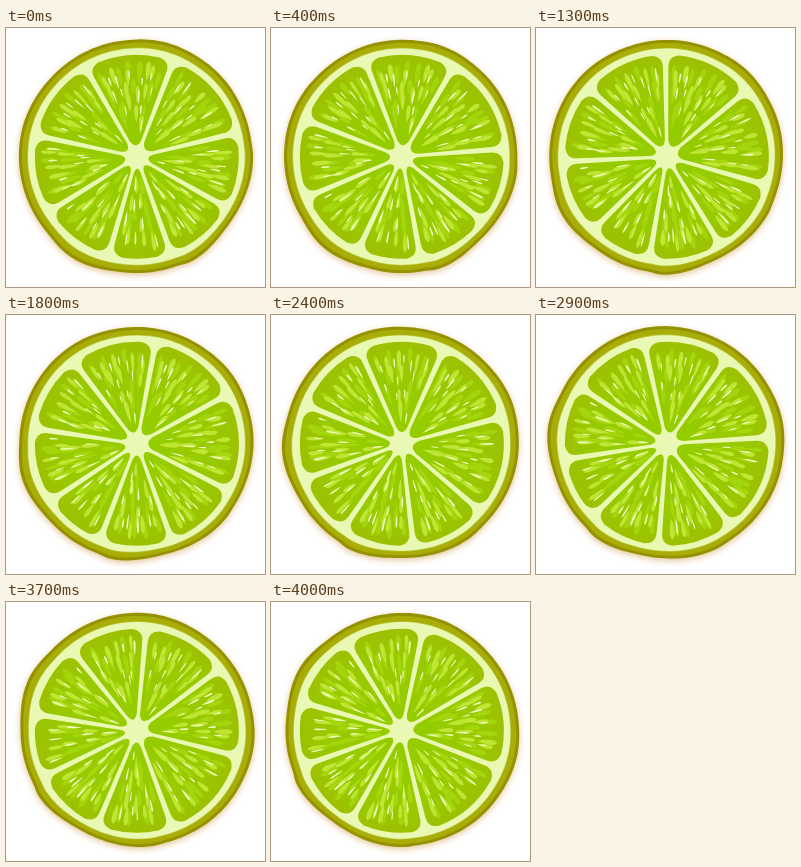
An HTML page for the animation above (4.1 s loop, 259 px wide and 259 px high).

```html
<!DOCTYPE html>
<html lang="en">
<head>
<meta charset="utf-8">
<title>Lime</title>
<style>
html, body { margin: 0; width: 100%; height: 100%; overflow: hidden; background: #fff; }
svg { display: block; width: 100vw; height: 100vh; }
#shade { filter: drop-shadow(0 2px 3px #dcb67acc); }
</style>
</head>
<body>
<svg viewBox="0 0 259 259">
  <defs>
    <radialGradient id="pulp" gradientUnits="userSpaceOnUse" cx="0" cy="0" r="103">
      <stop offset=".3" stop-color="#95cc00"/>
      <stop offset=".75" stop-color="#98c900"/>
      <stop offset="1" stop-color="#9dc002"/>
    </radialGradient>
  </defs>
  <g id="shade"><g id="slice"></g></g>
</svg>
<script>
const LOOP = 4100, STEP = 100, TURN = 22.5; // degrees per second
const CX = 130.8, CY = 128.8;
const walls = [240, 291, 346.5, 389.5, 430.5, 466, 508, 552, 600];
// Peel outline: angle and radius of its corners and flats
const peel = [[0, 116.3], [36, 114.2], [63, 118], [70, 116.3], [95, 116.3], [123, 120], [142, 117.5],
  [193, 118], [225, 116.8], [261, 117], [283, 118], [306, 117], [351, 115.5], [360, 116.3]];
const slice = document.getElementById('slice');
const rad = a => a * Math.PI / 180;
const pt = (r, a) => [r * Math.cos(rad(a)), r * Math.sin(rad(a))];
const str = p => p.map(v => v.toFixed(2)).join(' ');

let seed = 29;
function rnd(lo = 0, hi = 1) {
  seed = (seed * 16807) % 2147483647;
  return lo + (hi - lo) * seed / 2147483647;
}

function add(d, fill) {
  const el = document.createElementNS('http://www.w3.org/2000/svg', 'path');
  el.setAttribute('d', d);
  el.setAttribute('fill', fill);
  slice.append(el);
}

function peelRadius(a) {
  const i = peel.findIndex(p => p[0] > a);
  const [a0, r0] = peel[i - 1], [a1, r1] = peel[i];
  const k = (1 - Math.cos(Math.PI * (a - a0) / (a1 - a0))) / 2;
  return r0 + (r1 - r0) * k;
}

// Peel outline moved inwards, with its bumps flattened by "keep"
function ring(inset, keep) {
  const pts = [];
  for (let a = 0; a < 360; a += 2) {
    pts.push(str(pt(117 - inset + (peelRadius(a) - 117) * keep, a)));
  }
  return 'M' + pts.join('L') + 'Z';
}

// Point beside a wall, kept clear of the membrane
function beside(r, a, side) {
  const [x, y] = pt(r, a), [nx, ny] = pt(1.4 + r * 0.015, a + 90 * side);
  return str([x + nx, y + ny]);
}

function segment(a, b) {
  const R = 102, mid = (a + b) / 2;
  return `M${beside(17, a, 1)}L${beside(90, a, 1)}Q${beside(100.5, a, 1)} ${str(pt(R, a + 8))}` +
    `A${R} ${R} 0 0 1 ${str(pt(R, b - 8))}Q${beside(100.5, b, -1)} ${beside(90, b, -1)}` +
    `L${beside(17, b, -1)}Q${str(pt(7, mid))} ${beside(17, a, 1)}Z`;
}

// Long drop, narrow towards the middle
function drop(r, a, len, w) {
  const s = w / r * 57.3 / 2;
  return `M${str(pt(r, a))}Q${str(pt(r + len * .25, a - s))} ${str(pt(r + len * .75, a - s * .9))}` +
    `Q${str(pt(r + len * 1.15, a))} ${str(pt(r + len * .75, a + s * .9))}` +
    `Q${str(pt(r + len * .25, a + s))} ${str(pt(r, a))}Z`;
}

function drops(a, b, rows, gap, len, width) {
  let d = '';
  for (let k = 0; k < rows; k++) {
    const r0 = 22 + k * 66 / rows;
    const pad = 2.5 + 110 / r0, span = b - a - 2 * pad;
    const n = Math.max(1, Math.round(rad(span) * r0 / gap));
    for (let i = 0; i < n; i++) {
      const ang = a + pad + span * (i + rnd(.1, .9)) / n;
      const r = r0 + rnd(-4, 8), l = rnd(...len);
      d += drop(r, ang, Math.min(l, 97 - r), rnd(...width) * (.6 + r / 170));
    }
  }
  return d;
}

function build() {
  add(ring(0, 1), '#959200');
  add(ring(3, .9), '#a9ad08');
  add(ring(8, .5), '#bccb42');
  add(ring(8.7, .5), '#e9f9b4');
  for (let i = 0; i < 8; i++) {
    const a = walls[i], b = walls[i + 1];
    add(segment(a, b), 'url(#pulp)');
    add(drops(a, b, 4, 11, [16, 28], [3.5, 5]), '#a3d60c');
    add(drops(a, b, 4, 11, [14, 25], [3, 4.6]), '#bfe634');
    add(drops(a, b, 4, 11, [9, 17], [1.2, 1.9]), '#f1fbc2');
  }
}

function draw(ms) {
  const t = Math.floor((ms % LOOP) / STEP) * STEP;
  slice.setAttribute('transform', `translate(${CX} ${CY}) rotate(${t / 1000 * TURN})`);
}

build();
draw(0);
const start = performance.now();
function tick() {
  draw(performance.now() - start);
  requestAnimationFrame(tick);
}
requestAnimationFrame(tick);
</script>
</body>
</html>
```
